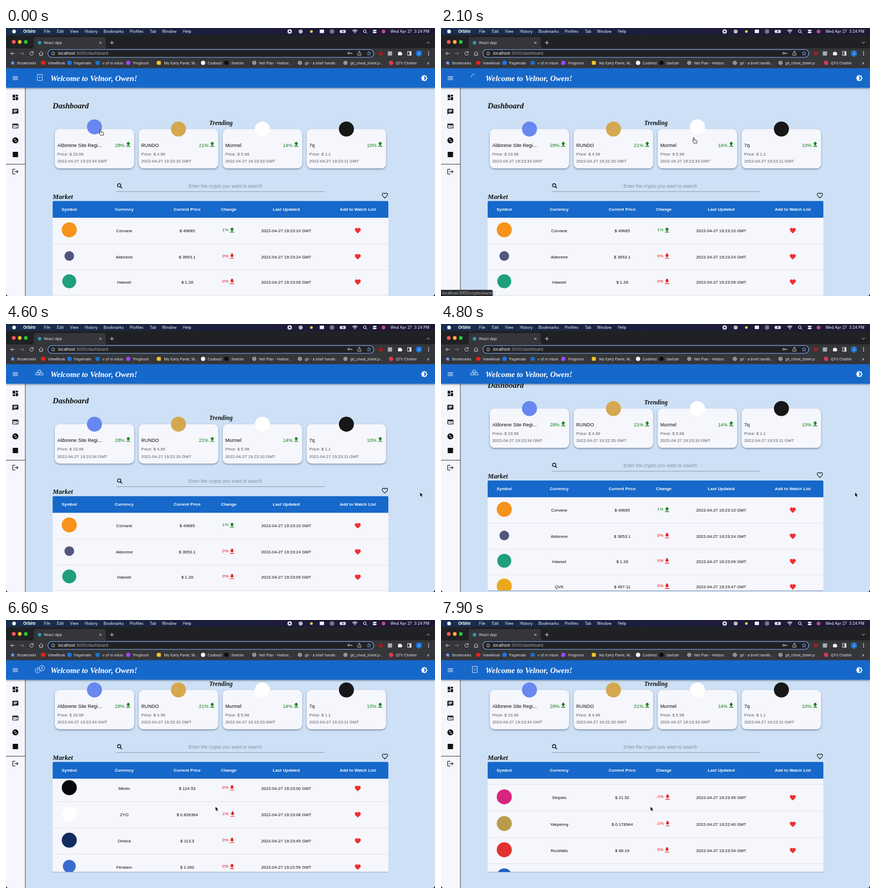
Recreate the animation shown at these times as an HTML page. Size 800 px wide and 500 px high, loop 8 s.

```html
<!DOCTYPE html>
<html lang="en">
<head>
<meta charset="utf-8">
<title>Dashboard</title>
<style>
html, body { margin: 0; width: 100%; height: 100%; overflow: hidden; background: #000; }
svg { display: block; width: 800px; height: 500px; font-family: "Liberation Sans", Arial, sans-serif; }
text { white-space: pre; }
.ui { font-family: Inter, Roboto, sans-serif; }
.script { font-family: "Liberation Serif", serif; font-weight: bold; font-style: italic; }
.cell { font-size: 7.78px; letter-spacing: .083px; }
.line { fill: none; stroke: #fff; stroke-width: .8; }
</style>
</head>
<body>
<svg id="stage" viewBox="0 0 800 500">
  <defs>
    <clipPath id="page"><rect x="36.5" y="111" width="764" height="389"/></clipPath>
    <clipPath id="body"><rect x="87" y="353.5" width="626" height="174.5"/></clipPath>
    <linearGradient id="night">
      <stop offset="0" stop-color="#17304f"/><stop offset=".5" stop-color="#1c1d3c"/><stop offset="1" stop-color="#1e1835"/>
    </linearGradient>
    <filter id="shade" x="-10%" y="-20%" width="120%" height="150%">
      <feDropShadow dx="0" dy="1.5" stdDeviation="1.4" flood-color="#123" flood-opacity=".48"/>
    </filter>
    <filter id="faint" x="-5%" y="-5%" width="110%" height="110%">
      <feDropShadow dx="0" dy=".8" stdDeviation=".7" flood-color="#123" flood-opacity=".4"/>
    </filter>
  </defs>
</svg>
<script>
const stage = document.getElementById('stage');
const $ = id => document.getElementById(id);

// ---- markup helpers ----
const rect = (x, y, w, h, fill, more = '') =>
  `<rect x="${x}" y="${y}" width="${w}" height="${h}" fill="${fill}" ${more}/>`;
const disc = (x, y, r, fill, more = '') => `<circle cx="${x}" cy="${y}" r="${r}" fill="${fill}" ${more}/>`;
const text = (x, y, s, size, fill, more = '') =>
  `<text x="${x}" y="${y}" font-size="${size}" fill="${fill}" ${more}>${s}</text>`;
const ui = (x, y, s, size = 6.7, fill = '#e8eaed', more = '') => text(x, y, s, size, fill, 'class="ui" ' + more);
const cell = (x, y, s, fill = '#08080a', more = '') => text(x, y, s, 7.78, fill, 'class="cell" ' + more);
const mid = 'text-anchor="middle"';
const path = (d, more = '') => `<path d="${d}" ${more}/>`;
const stroke = (d, color = '#e8eaed', w = .9) => path(d, `fill="none" stroke="${color}" stroke-width="${w}"`);
// 24-unit icon centred at x, y
const icon = (x, y, d, fill, k = .555, more = '') =>
  path(d, `transform="translate(${x} ${y}) scale(${k}) translate(-12 -12)" fill="${fill}" ${more}`);

const ICON = {
  menu: 'M3 18h18v-2H3zM3 13h18v-2H3zM3 6v2h18V6z',
  grid: 'M3 13h8V3H3zM3 21h8v-6H3zM13 21h8V11h-8zM13 3v6h8V3z',
  chat: 'M20 2H4Q2 2 2 4V22l4-4h14q2 0 2-2V4q0-2-2-2zM6 9h12v2H6zM14 14H6v-2h8zM18 8H6V6h12z',
  news: 'M20 4H4Q2 4 2 6v12q0 2 2 2h16q2 0 2-2V6q0-2-2-2zM15 18H4v-4h11zM15 13H4V9h11zM20 18h-4V9h4z',
  swap: 'M12 2a10 10 0 1 0 .01 0zM7 9l3-3v2h4v2h-4v2zM17 15l-3 3v-2h-4v-2h4v-2z',
  exit: 'M17 7l-1.4 1.4 2.6 2.6H8v2h10.2l-2.6 2.6L17 17l5-5zM4 5h8V3H4Q2 3 2 5v14q0 2 2 2h8v-2H4z',
  sun: 'M20 8.7V4h-4.7L12 .7 8.7 4H4v4.7L.7 12 4 15.3V20h4.7l3.3 3.3 3.3-3.3H20v-4.7l3.3-3.3zM12 18q-1.4 0-2.5-.5a6 6 0 0 0 0-11Q10.6 6 12 6a6 6 0 0 1 0 12z',
  heart: 'M12 21.3l-1.5-1.3C5.4 15.4 2 12.3 2 8.5 2 5.4 4.4 3 7.5 3c1.7 0 3.4.8 4.5 2.1C13.1 3.8 14.8 3 16.5 3 19.6 3 22 5.4 22 8.5c0 3.8-3.4 6.9-8.6 11.5z',
  up: 'M5 20h14v-2H5zM5 10h4v6h6v-6h4l-7-7z',
  down: 'M19 9h-4V3H9v6H5l7 7zM5 18v2h14v-2z'
};
const GREEN = '#0b8215', RED = '#e8130f';
const even = 'fill-rule="evenodd"';

// ---- browser window ----
function menuBar() {
  const items = [[71, 'File'], [95, 'Edit'], [119, 'View'], [147, 'History'], [182, 'Bookmarks'],
    [231, 'Profiles'], [268, 'Tab'], [291, 'Window'], [330, 'Help']];
  return rect(0, 0, 800, 13, 'url(#night)') + disc(15, 6.5, 3.5, '#f0f0f4') +
    ui(32, 9, 'Orbiro', 7.5, '#fff', 'font-weight="700"') +
    items.map(([x, s]) => ui(x, 9, s, 7.1, '#fff')).join('') +
    disc(529, 6.5, 4, '#fff') + rect(527.3, 4.8, 3.4, 3.4, '#1d1a36') +
    disc(549.5, 6.5, 3.8, '#b9b9c4') + disc(569.5, 6.5, 2.6, '#e6c84f') +
    rect(585, 3, 8, 6.5, '#f2f2f4', 'rx="1"') +
    disc(608, 6.5, 3.4, 'none', 'stroke="#eee"') + path('M607 4.8l3 1.7-3 1.7z', 'fill="#eee"') +
    rect(622.5, 3.8, 11, 5.4, '#eee', 'rx="1.3"') + path('M629 3l-3 4h2l-1 3 3-4h-2z', 'fill="#1d1a36"') +
    stroke('M646 5.2q4.5-3.5 9 0M647.7 7q2.8-2.2 5.6 0', '#fff', 1.2) + disc(650.5, 9, 1, '#fff') +
    disc(669, 6, 2.5, 'none', 'stroke="#fff"') + stroke('M671 8l2.5 2.5', '#fff', 1) +
    rect(684, 3.5, 7, 2.6, '#fff', 'rx="1.3"') + rect(684, 7, 7, 2.6, '#fff', 'rx="1.3"') +
    disc(704, 6.5, 3.5, '#b34f7d') + ui(717, 9, 'Wed Apr 27  3:24 PM', 7.2, '#fff');
}

function tabsAndTools() {
  const globe = x => disc(x, 65, 3.8, '#aeb2b8') + stroke(`M${x - 3} 63.5h6M${x - 3} 66.5h6M${x} 61.5v7`, '#4a4c50', .6);
  const square = c => x => rect(x - 3.7, 61.5, 7.4, 7, c, 'rx="1.2"');
  const round = c => x => disc(x, 65, 4, c);
  const marks = [[69.5, 78, 'ViewNook', square('#f0211d')], [118.5, 127, 'Pagemate', round('#1877f2')],
    [171, 180, 'v of m inbox', square('#1976d2')], [228, 237, 'Pingloom', round('#a044f5')],
    [285, 295, 'My Early Panel, W...', square('#f6c52f')], [367.5, 376, 'Codnest', round('#f3f3f3')],
    [411, 420, 'Sextole', round('#0c0d10')], [463, 472, 'Net Plan - Harbor...', globe],
    [548, 557, 'git - a brief handb...', globe], [633, 642, 'git_cheat_sheet.p...', globe],
    [718, 727, 'QTV Chatter', round('#d33c59')]];
  return rect(0, 13, 800, 26, '#202124') + path('M48 38q4 0 4-4V21q0-4 4-4H182q4 0 4 4v13q0 4 4 4z', 'fill="#35363a"') +
    rect(0, 38, 800, 37, '#35363a') +
    ['#ff5f57', '#febc2e', '#28c840'].map((c, i) => disc(14.5 + i * 11.2, 26, 3.4, c)).join('') +
    disc(62.5, 27.5, 3.2, '#2b9dba') + ui(71, 30, 'React App', 6.8) +
    stroke('M174 25.5l4 4m0-4l-4 4M194 27.5h7m-3.5-3.5v7') + stroke('M785 26l2.5 2.5 2.5-2.5') +
    stroke('M16 47.5H9m3-3l-3 3 3 3') + stroke('M26 47.5h7m-3-3l3 3-3 3', '#85888d') +
    stroke('M50.5 45.5a3.3 3.3 0 1 0 .5 2.5M51 43.5v2.5h-2.5') + stroke('M61.5 47.5l4-3.5 4 3.5M62.8 47v4h5.4v-4') +
    rect(78.3, 40.2, 607.5, 14.5, '#202124', 'rx="7.2" stroke="#7faef5" stroke-width="1.1"') +
    disc(88, 47.5, 3, 'none', 'stroke="#cfd2d6" stroke-width=".8"') + stroke('M88 47v2.5M88 45.3v.9', '#cfd2d6', .8) +
    ui(97, 50, 'localhost<tspan fill="#a3a7ad">:3000/dashboard</tspan>', 7.5, '#fff') +
    disc(639, 47, 1.6, 'none', 'stroke="#dcdfe3"') + stroke('M641 47h4v2') +
    stroke('M657 46.5h-1v4.5h6v-4.5h-1M659 49v-6m-2 2l2-2 2 2', '#dcdfe3', .8) +
    stroke('M677 43.5l1 2.7 2.7.1-2.1 1.8.8 2.7-2.4-1.6-2.4 1.6.8-2.7-2.1-1.8 2.7-.1z', '#8ab4f8', .8) +
    rect(695, 44, 8, 7, '#9c1f27', 'rx="2"') + rect(712, 43.5, 8, 8, '#a9abb0', 'rx="1"') +
    path('M731 45h2.2a1.3 1.3 0 0 1 2.6 0H738v2.2a1.3 1.3 0 0 1 0 2.6V51h-7z', 'fill="#eee"') +
    rect(749, 44, 6.5, 7, 'none', 'stroke="#eee"') + rect(752.5, 44, 3, 7, '#eee') +
    disc(770, 47.5, 6, '#1a6fd4') + ui(770, 50, 'J', 7, '#fff', mid) +
    [44.5, 47.5, 50.5].map(y => disc(788, y, .9, '#eee')).join('') +
    path('M12.5 61l1.2 2.7 3 .2-2.3 2 .8 3-2.7-1.6-2.7 1.6.8-3-2.3-2 3-.2z', 'fill="#6ea6f7"') +
    ui(21, 67.5, 'Bookmarks') + ui(785, 67.5, '»', 8) +
    marks.map(([x, tx, s, draw]) => draw(x) + ui(tx, 67.5, s)).join('');
}

// ---- app ----
const loader = (id, d) => `<path id="${id}" d="${d}" class="line" pathLength="1"/>`;
const ring = (x, y, r) => `M${x - r} ${y}a${r} ${r} 0 1 1 ${2 * r} 0a${r} ${r} 0 1 1 ${-2 * r} 0`;
const bar = (x, y) => `M${x} ${y}l1.3-4h4.4l1.3 4z`;

function appFrame() {
  return rect(0, 111, 36, 389, '#f6f6fd') + rect(35.6, 111, .9, 389, '#333') +
    rect(0, 75, 800, 36.4, '#1668ca', 'filter="url(#shade)"') +
    rect(0, 253.7, 36, .9, '#222') + icon(17.5, 93.5, ICON.menu, '#fff') + icon(780, 93.5, ICON.sun, '#fff', .555, even) +
    text(83, 99, 'Welcome to Velnor, Owen!', 14.8, '#fff', 'class="script"') +
    ['grid', 'chat', 'news', 'swap'].map((k, i) => icon(17.5, 129.5 + i * 26.7, ICON[k], '#111', .555, even)).join('') +
    rect(12.5, 231, 10, 10, '#111', 'rx="1.2"') + icon(17.5, 268, ICON.exit, '#111') +
    loader('note', 'M58.5 86.5h9v11.5h-9z') + loader('chart', 'M56 87v10.5h11') +
    loader('trend', 'M57 97l4-4 2 1.5 4.5-5') + loader('coin', ring(62, 92, 5.6)) +
    loader('bars', bar(58.5, 90) + bar(54.7, 95) + bar(62.3, 95)) +
    loader('pair', ring(59, 94, 4.6) + ring(67, 90, 5)) +
    ui(63, 94.2, '0', 5, '#fff', mid + ' id="noteMark"') + ui(62, 94, 'D', 5.5, '#fff', mid + ' id="coinMark"') +
    `<g id="pairMark">${ui(59, 96, '€', 5.5, '#fff', mid)}${ui(67, 92, '$', 5.5, '#fff', mid)}</g>`;
}

const cards = [
  ['Aldorene Site Regi...', '28%', '23.69', '23:34', '#6688f0'],
  ['RUNDO', '21%', '4.99', '22:20', '#d5a84f'],
  ['Murmel', '14%', '5.98', '23:33', '#fff'],
  ['7q', '10%', '1.1', '23:11', '#171717']];

function card([name, pct, price, time, color], i) {
  const x = 91 + i * 156.6;
  return rect(x, 188.5, 148, 73.3, '#f6f6fd', 'rx="9" filter="url(#shade)"') +
    disc(x + 74, 188.5, 14, color, `id="token${i}"`) +
    text(x + 4.7, 221.5, name, 8.9, '#08080a', 'letter-spacing=".08"') +
    text(x + 130, 221.5, pct, 8.9, GREEN, 'text-anchor="end"') + icon(x + 137, 217, ICON.up, GREEN) +
    cell(x + 4.7, 237.5, 'Price: $ ' + price, '#55555c') +
    cell(x + 4.7, 251.2, `2022-04-27 19:${time} GMT`, '#55555c');
}

// name, price, change, time, colour, radius, centre within the list
const rows = [
  ['Corvane', '49685', 1, '23:10', '#f7931a', 14, 24.5],
  ['Aldorene', '3653.1', 0, '23:24', '#50567c', 9, 73.3],
  ['Hawsel', '1.28', 0, '23:09', '#1ea07c', 13, 120.5],
  ['QVK', '497.11', 0, '23:47', '#eba81c', 14, 167.7],
  ['Plainpeg', '1.28', 0, '23:12', '#2775ca', 14, 215.5],
  ['Mirelo', '124.53', 0, '23:00', '#07070d', 14, 264],
  ['ZYO', '0.826364', -1, '23:08', '#fff', 14, 313],
  ['Ombra', '113.3', 0, '23:45', '#102b5c', 14, 362],
  ['Fendaro', '1.062', 0, '22:59', '#3a6cd0', 12, 410.7],
  ['Stripelo', '21.52', -1, '23:49', '#d8267f', 14, 460],
  ['Yakpenny', '0.178944', -1, '22:40', '#b99c4b', 14, 509.7],
  ['Rockfalls', '88.19', 0, '23:04', '#e03231', 14, 558.7],
  ['Tollbit', '1.28', 0, '23:15', '#1f5fbf', 14, 607.5]];

function row([name, price, change, time, color, r, c]) {
  const y = 353.5 + c, rise = change > 0, tint = rise ? GREEN : RED, x = change < 0 ? 1 : 0;
  return disc(118, y - 1.5, r, color) + cell(220.5, y + 3, name, '#08080a', mid) +
    cell(338, y + 3, '$ ' + price, '#08080a', mid) + cell(409 - x, y + 1, change + '%', tint, mid) +
    icon(421.5 + x, y - 1, rise ? ICON.up : ICON.down, tint) +
    cell(522.7, y + 3, `2022-04-27 19:${time} GMT`, '#08080a', mid) +
    icon(656, y, ICON.heart, '#f0302f') + rect(87, y + 24.3, 626, .7, '#d9d9e0');
}

function dashboard() {
  const heads = [[118, 'Symbol'], [220.5, 'Currency'], [338, 'Current Price'], [415.5, 'Change'],
    [522.7, 'Last Updated'], [656, 'Add to Watch List']];
  const title = (x, y, s, size) => text(x, y, s, size, '#111', 'class="script"');
  return title(87, 149.5, 'Dashboard', 14.8) + title(379, 181, 'Trending', 11.5) + cards.map(card).join('') +
    disc(211, 293.6, 3.1, 'none', 'stroke="#111" stroke-width="1.3"') + stroke('M213.3 296l3 3', '#111', 1.5) +
    text(409, 297.5, 'Enter the crypto you want to search', 8.75, '#8492a2', mid) +
    rect(206, 304.8, 388.5, .8, '#7f8c9a', 'id="underline"') +
    title(87, 318.5, 'Market', 12.6) +
    icon(706.5, 312.5, ICON.heart, 'none', .5, 'stroke="#111" stroke-width="2.2"') +
    rect(87, 322.8, 626, 205, '#f6f6fd', 'rx="2" filter="url(#faint)"') +
    `<g clip-path="url(#body)"><g id="list">${rows.map(row).join('')}</g></g>` +
    path('M87 353.9V324.8q0-2 2-2H711q2 0 2 2v29.1z', 'fill="#1668ca"') +
    heads.map(([x, s]) => cell(x, 341, s, '#fff', mid + ' font-weight="bold"')).join('');
}

const pointers =
  path('M0 0V8l1.8-1.6L3.1 9.3l1.5-.7L3.4 5.8H5.8z', 'id="arrow" fill="#000" stroke="#fff" stroke-width=".6"') +
  path('M-1 0q1.3-1.3 2 .4V4l4 .9q1.5.5 1.3 2L5.6 10H.5L-2.5 6q.3-1.3 1.5-.4z', 'id="hand" fill="#fff" stroke="#111" stroke-width=".9"') +
  path('M-1.6-4.5Q0-4.5 0-3.5Q0-4.5 1.6-4.5M0-3.5V3.5M-1.6 4.5Q0 4.5 0 3.5Q0 4.5 1.6 4.5',
    'id="beam" fill="none" stroke="#222" stroke-width=".8"');

stage.innerHTML += rect(0, 75, 800, 425, '#cde0f5') +
  `<g clip-path="url(#page)"><g id="scroll">${dashboard()}</g></g>` + appFrame() + tabsAndTools() + menuBar() +
  `<g id="status">${rect(-3, 488.5, 99.5, 14, '#2a2b2f', 'rx="2.5"')}${ui(2, 496.7, '', 6.9, '#bfc3c8', 'id="address"')}</g>` +
  path('M0 495v5h5q-5 0-5-5zM800 495v5h-5q5 0 5-5z', 'fill="#000"') + `<g id="pointer">${pointers}</g>`;

// ---- motion ----
const clamp = v => Math.max(0, Math.min(1, v));
const smooth = u => u * u * (3 - 2 * u);
// value of keyed [time, ...values] at t
function track(keys, t, ease = smooth) {
  const n = keys.findIndex(k => k[0] > t);
  if (n < 0) return keys.at(-1).slice(1);
  if (n === 0) return keys[0].slice(1);
  const a = keys[n - 1], b = keys[n], u = ease((t - a[0]) / (b[0] - a[0]));
  return a.slice(1).map((v, i) => v + (b[i + 1] - v) * u);
}
const span = (t, a, b, fade) => clamp(Math.min((t - a) / fade, (b - t) / fade));

const pointerKeys = [[0, 176, 190], [.35, 178, 194], [1, 313, 196], [1.3, 316, 200], [1.9, 470, 202],
  [2.4, 474, 210], [3.1, 428.5, 289], [3.4, 436, 296], [4.3, 772, 314], [4.95, 772, 314], [5.45, 390.5, 348]];
const pageKeys = [[4.5, 0], [4.6, 1.6], [4.85, 34], [5.2, 58]];
const listKeys = [[5.5, 0], [5.6, 15], [5.9, 90], [6.2, 165], [6.6, 245], [7, 318], [7.4, 375], [7.9, 424], [8, 430]];
const hovers = [[-1, .55], [.65, 1.6], [1.65, 2.75]];
const loaders = { note: [7.2, 8.6], chart: [.6, 2], trend: [1, 2], coin: [2, 3.7], bars: [3.7, 5.1], pair: [5.1, 7.2] };
const marks = { noteMark: [7.4, 8.4], coinMark: [2.3, 3.5], pairMark: [5.9, 7] };

function draw(t) {
  const [x, y] = track(pointerKeys, t);
  $('pointer').setAttribute('transform', `translate(${x} ${y})`);
  const inField = y > 276 && y < 305 && x < 594;
  const shape = inField ? 'beam' : t < .5 || t > .68 && t < 1.5 || t > 1.68 && t < 2.75 ? 'hand' : 'arrow';
  for (const id of ['arrow', 'hand', 'beam']) $(id).style.display = id === shape ? '' : 'none';
  $('underline').setAttribute('fill', inField ? '#111' : '#7f8c9a');

  $('scroll').setAttribute('transform', `translate(0 ${-track(pageKeys, t)[0]})`);
  $('list').setAttribute('transform', `translate(0 ${-track(listKeys, t, u => u)[0]})`);
  hovers.forEach(([a, b], i) =>
    $('token' + i).setAttribute('transform', `translate(0 ${-4 * smooth(span(t, a, b, .2))})`));

  $('status').style.opacity = span(t, .2, 3.4, .2);
  $('address').textContent = 'localhost:3000/crypto/' + (t < .65 ? 'aldorene' : t < 1.65 ? 'rundo' : 'murmel');

  const phase = ([a, b], fade) => Math.max(span(t, a, b, fade), span(t + 8, a, b, fade));
  for (const id in loaders) {
    const p = phase(loaders[id], .35);
    $(id).style.strokeDasharray = p + ' 2';
    $(id).style.display = p ? '' : 'none';
  }
  for (const id in marks) $(id).style.opacity = phase(marks[id], .25);
}

const start = performance.now();
function tick() {
  draw((performance.now() - start) % 8000 / 1000);
  requestAnimationFrame(tick);
}
tick();
</script>
</body>
</html>
```
